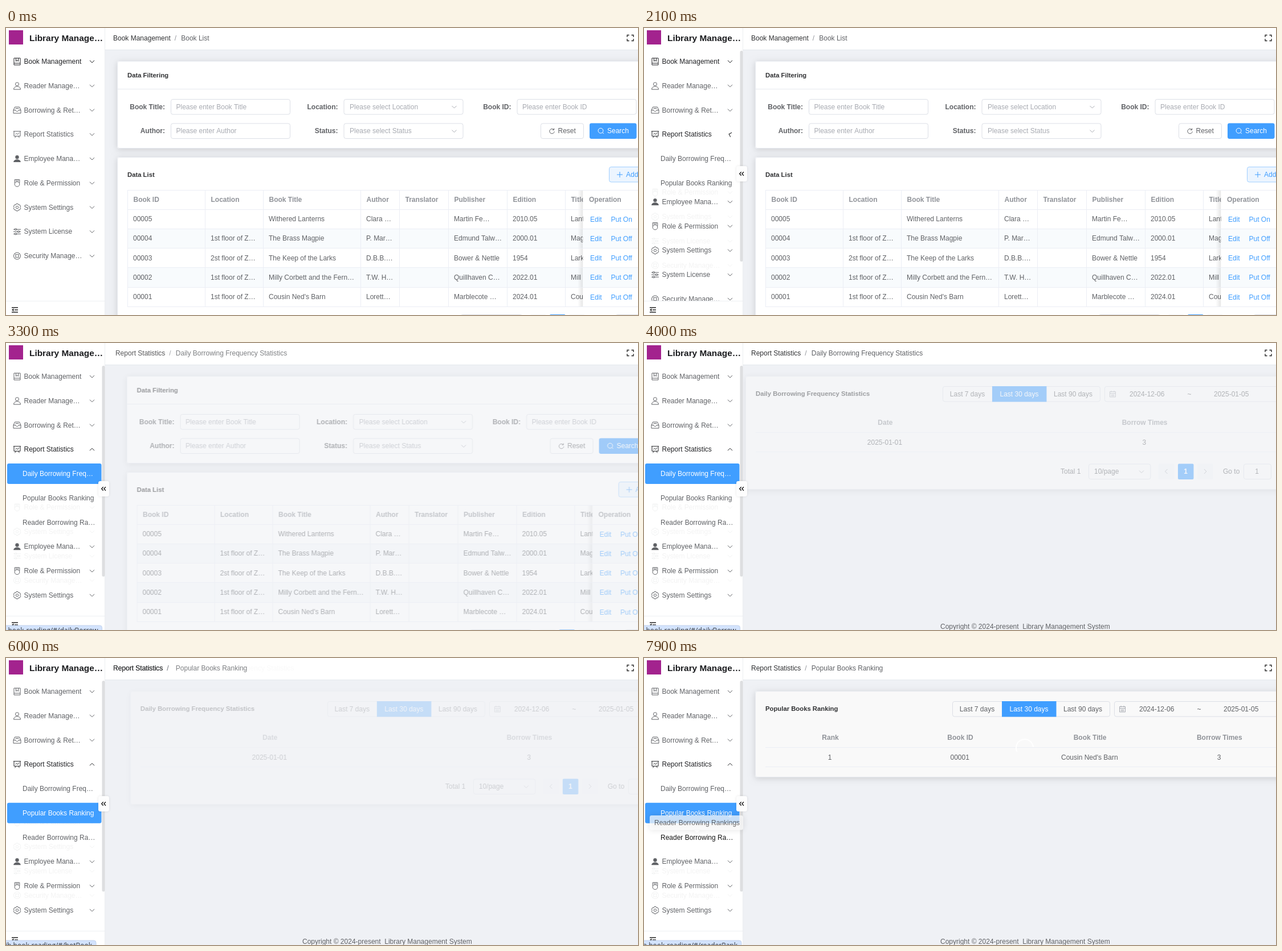
Recreate the animation shown at these times as an HTML page with a canvas. Size 1109 by 505 pixels, loop 8 s.

```html
<!DOCTYPE html>
<html lang="en">
<head>
<meta charset="utf-8">
<title>Library admin</title>
<style>
html, body { margin: 0; width: 100%; height: 100%; overflow: hidden; background: #fff; }
canvas { display: block; }
</style>
</head>
<body>
<canvas id="stage" width="1109" height="505"></canvas>
<script>
const LOOP = 8000, STEP = 100, ROW = 42.76;
const FAMILY = '"Liberation Sans", Arial, sans-serif';
const REG = '12px ' + FAMILY, BOLD = 'bold 12px ' + FAMILY, HEAD = 'bold 11.3px ' + FAMILY;
const INK = '#303133', TEXT = '#606266', MUTED = '#909399', HINT = '#a8abb2';
const BLUE = '#409eff', LINE = '#ebeef5', BORDER = '#dcdfe6', DARK = '#141414';

const stage = document.getElementById('stage').getContext('2d');
const layer = document.createElement('canvas');
layer.width = 1160;
layer.height = 505;
const page = layer.getContext('2d');
let c = stage;

// ---- easing ----
const clamp = v => Math.max(0, Math.min(1, v));
function bezier(x1, y1, x2, y2) {
  const at = (a, b, u) => 3 * a * u * (1 - u) ** 2 + 3 * b * u * u * (1 - u) + u ** 3;
  return x => {
    if (x <= 0 || x >= 1) return clamp(x);
    let lo = 0, hi = 1;
    for (let i = 0; i < 24; i++) {
      const mid = (lo + hi) / 2;
      if (at(x1, x2, mid) < x) lo = mid; else hi = mid;
    }
    return at(y1, y2, lo);
  };
}
const ease = bezier(.25, .1, .25, 1);
const easeInOut = bezier(.42, 0, .58, 1);

// ---- drawing helpers ----
function text(s, x, y, color = TEXT, font = REG, align = 'left') {
  c.font = font;
  c.fillStyle = color;
  c.textAlign = align;
  c.fillText(s, x, y);
}
function rect(x, y, w, h, color) {
  c.fillStyle = color;
  c.fillRect(x, y, w, h);
}
function box(x, y, w, h, fill, border, r = 3.4) {
  c.beginPath();
  c.roundRect(x, y, w, h, r);
  if (fill) { c.fillStyle = fill; c.fill(); }
  if (border) { c.strokeStyle = border; c.lineWidth = 1; c.stroke(); }
}
function path(d, x, y, color, width = 1, fill = false) {
  c.save();
  c.translate(x, y);
  const p = new Path2D(d);
  c.strokeStyle = c.fillStyle = color;
  c.lineWidth = width;
  if (fill) c.fill(p); else c.stroke(p);
  c.restore();
}
function chevron(x, y, color, turn = 0) {
  c.save();
  c.translate(x, y);
  c.rotate(turn);
  path('M-4-2L0 2L4-2', 0, 0, color);
  c.restore();
}
function shadowed(blur, color, dy, draw) {
  c.save();
  c.shadowBlur = blur;
  c.shadowColor = color;
  c.shadowOffsetY = dy;
  draw();
  c.restore();
}
function card(y, h, fill) {
  shadowed(12, 'rgba(0,0,0,.14)', 2, () => box(195, y, 990, h, fill, null));
  box(195.5, y + .5, 990, h - 1, null, '#e6e9ef');
}
const ring = r => `M${-r} 0a${r} ${r} 0 1 0 ${2 * r} 0a${r} ${r} 0 1 0 ${-2 * r} 0`;

// ---- sidebar ----
const ICONS = [
  'M-5.5-6H5.5V6H-5.5ZM-5.5 3H5.5M-2-6V-.5L0-2L2-.5V-6',
  'M-3-3a3 3 0 1 0 6 0a3 3 0 1 0-6 0M-6 6.3c0-7 12-7 12 0Z',
  'M-6.5 0L-4-5.5H4L6.5 0V5.5H-6.5ZM-6.5 0H-2.5C-2.5 3 2.5 3 2.5 0H6.5M-3-3H3',
  'M-6.5-5.5H6.5M-5.5-5.5V3H5.5V-5.5M-3 0L-1-2L1 0L3.5-3M-2 3L-4 6M2 3L4 6',
  'M-3.2-2.8a3.2 3.2 0 1 0 6.4 0a3.2 3.2 0 1 0-6.4 0M-6.3 6c0-6.5 12.6-6.5 12.6 0Z',
  'M-4.3 2a4.3 4.3 0 1 0 8.6 0a4.3 4.3 0 1 0-8.6 0M-4.3 0V-6H4.3V0M-1.5-6V-2M1.5-6V-2',
  ring(2.2) + 'M-1.5-6.3H1.5L2.3-4.5H4.6L6.2-1.7L5 0L6.2 1.7L4.6 4.5H2.3L1.5 6.3H-1.5L-2.3 4.5H-4.6L-6.2 1.7L-5 0L-6.2-1.7L-4.6-4.5H-2.3Z',
  'M-6.5-4H-4M-1-4H6.5M-6.5 0H1M4 0H6.5M-6.5 4H-4M-1 4H6.5M-4-5.2H-1V-2.8H-4ZM1-1.2H4V1.2H1ZM-4 2.8H-1V5.2H-4Z',
  ring(6) + ring(2.8) + 'M-4.2-4.2L-2-2M4.2-4.2L2-2M-4.2 4.2L-2 2M4.2 4.2L2 2'
];
const MENU = ['Book Management', 'Reader Manage…', 'Borrowing & Ret…', 'Report Statistics',
  'Employee Mana…', 'Role & Permission', 'System Settings', 'System License', 'Security Manage…'];
const SUBMENU = ['Daily Borrowing Freq…', 'Popular Books Ranking', 'Reader Borrowing Ra…'];
const REPORT = 3;

function menuItem(i, y, color, turn) {
  path(ICONS[i], 19.5, y, color, 1, i === 4);
  text(MENU[i], 31.5, y + 4, color);
  chevron(151, y, color, turn);
}

function menuColor(i, t) {
  const dark = i === 0 ? t < 2900
    : i === REPORT ? (t >= 1700 && t < 2400) || t >= 2900
    : i === 4 ? t >= 1200 && t < 1500
    : i === 5 && t >= 1200 && t < 1700;
  return dark ? '#222326' : TEXT;
}

function subColor(i, t, active) {
  if (i === active) return '#fff';
  const hover = [t >= 2400 && t < 2800, t >= 5000 && t < 5700, t >= 7700][i];
  return hover ? DARK : TEXT;
}

function sidebar(t) {
  rect(0, 0, 174, 505, '#fff');
  rect(173, 0, 1, 505, '#eceef1');
  box(5, 4, 25, 25, '#a3238e', null, 0);
  text('Library Manage…', 41, 23, '#1b1c1f', 'bold 15.4px ' + FAMILY);

  const open = easeInOut((t - 1934) / 300);
  const shift = open * 3 * ROW;
  const active = t >= 5700 ? 1 : t >= 2800 ? 0 : -1;

  c.save();
  c.beginPath();
  c.rect(0, 38, 174, 442);
  c.clip();

  // faint trail left by the unfolding rows
  if (t >= 2100) {
    c.globalAlpha = .08;
    for (let i = 5; i < 9; i++) {
      if (i === 6 && t >= 7700) continue;
      menuItem(i, 59 + i * ROW + 16.5, TEXT, 0);
    }
    c.globalAlpha = 1;
  }
  MENU.forEach((_, i) => {
    menuItem(i, 59 + i * ROW + (i > REPORT ? shift : 0), menuColor(i, t), i === REPORT ? open * Math.PI : 0);
  });
  c.beginPath();
  c.rect(0, 209, 174, shift);
  c.clip();
  SUBMENU.forEach((label, i) => {
    const y = 230 + i * ROW;
    if (i === active) box(2, y - 18, 165.5, 36, BLUE, null, 3);
    text(label, 29, y + 4, subColor(i, t, active));
  });
  c.restore();

  if (t >= 2100) box(168.5, 40, 5, 371, '#dddee0', null, 2.5);
  rect(0, 480, 173, 1, '#eef0f3');
  path('M10-4H21M15 0H21M10 4H21', 0, 496, '#222', 1.3);
  path('M10 0L13.5-2.6V2.6Z', 0, 496, '#222', 1, true);
}

function foldButton(t) {
  if (t >= 1500) shadowed(4, 'rgba(0,0,0,.1)', 0, () => box(162, 243, 19, 27, '#fdfdfd', null));
  if (t >= 900) path('M-.6-3.3L-3.6 0L-.6 3.3M3.6-3.3L.6 0L3.6 3.3', 171.3, 256.5, '#111', 1.3);
}

function statusBar(t) {
  if (t < 2400) return;
  const [w, url] = t >= 7700 ? [171, 'lib.book-reading/#/readerRank']
    : t >= 5000 ? [158, 'lib.book-reading/#/hotBook']
    : [168.5, 'lib.book-reading/#/dailyBorrow'];
  box(-1, 497, w + 1, 12, '#d3e3fd', '#c3d3ec', [0, 4, 0, 0]);
  text(url, w - 7, 509.5, '#33383f', '12px "Open Sans", sans-serif', 'right');
}

function tooltip(label, x, y, w, textX, arrowX, alpha) {
  if (alpha <= 0) return;
  c.save();
  c.globalAlpha = alpha;
  const shape = new Path2D();
  shape.roundRect(x, y, w, 25.5, 3.4);
  shape.moveTo(arrowX - 6, y + 25);
  shape.lineTo(arrowX, y + 30.5);
  shape.lineTo(arrowX + 6, y + 25);
  shadowed(11, 'rgba(0,0,0,.16)', 0, () => { c.fillStyle = '#fff'; c.fill(shape); });
  text(label, textX, y + 16.7, INK);
  c.restore();
}

function tooltips(t) {
  const fade = t < 1200 ? 0 : t < 1300 ? .5 : t < 1600 ? 1 : (1800 - t) / 300;
  tooltip('Employee Management', 12, 191, 143, 20.5, 83, fade);
  tooltip('Daily Borrowing Frequency Statistics', -1, 191, 210, 7, 93,
    t < 2500 || t >= 2800 ? 0 : t < 2600 ? .5 : 1);
  tooltip('Reader Borrowing Rankings', 10, 277, 164, 18, 93, t < 7800 ? 0 : t < 7900 ? .35 : .72);
}

// ---- header ----
function crumb(first, last, move, alpha, keepFirst) {
  c.save();
  c.font = REG;
  const end = 188 + c.measureText(first).width;
  c.globalAlpha = keepFirst ? 1 : alpha;
  text(first, 188 + (keepFirst ? 0 : move), 22, INK);
  text('/', end + 7 + (keepFirst ? 0 : move), 22, MUTED);
  c.globalAlpha = alpha;
  text(last, end + 18.5 + move, 22, TEXT);
  c.restore();
}

const CRUMBS = [['Book Management', 'Book List'],
  ['Report Statistics', 'Daily Borrowing Frequency Statistics'],
  ['Report Statistics', 'Popular Books Ranking']];

function header(t) {
  rect(174, 0, 935, 38, '#fff');
  rect(174, 38, 935, 1, '#e5e8ed');
  path('M-5.5-1.5V-5H-2M2-5H5.5V-1.5M5.5 1.5V5H2M-2 5H-5.5V1.5', 1095.5, 17.5, '#222', 1.3);
  const next = t >= 4500 ? 2 : 1;
  const e = ease((t - (next === 2 ? 5750 : 3050)) / 500);
  const keep = next === 2;
  if (e < 1) crumb(...CRUMBS[next - 1], 20 * e, (1 - e) ** 2, keep);
  if (e > 0) crumb(...CRUMBS[next], 20 * (1 - e), e, keep);
}

// ---- pages ----
function field(label, right, y, hint, select) {
  text(label, right, y + 17.5, TEXT, BOLD, 'right');
  const x = right + 10.5;
  box(x, y + .5, 209, 26.5, '#fff', BORDER);
  text(hint, x + (select ? 10 : 9), y + 17.5, HINT);
  if (select) chevron(x + 193.5, y + 14, HINT);
}

function pager(y) {
  text('Total 1', 748, y + 17.7);
  box(797.5, y + .5, 108.5, 26.5, null, BORDER);
  text('10/page', 807, y + 17.7);
  chevron(890, y + 14, HINT);
  box(920, y, 27.5, 27.5, '#f4f6f9', null, 2);
  box(954, y, 27.5, 27.5, BLUE, null, 2);
  box(988, y, 27.5, 27.5, '#f4f6f9', null, 2);
  path('M2-4L-2 0L2 4', 933.5, y + 13.5, HINT);
  path('M-2-4L2 0L-2 4', 1002, y + 13.5, HINT);
  text('1', 967.7, y + 17.7, '#fff', BOLD, 'center');
  text('Go to', 1033, y + 17.7);
  box(1069.5, y + .5, 48, 26.5, null, BORDER);
  text('1', 1092.7, y + 17.7, TEXT, REG, 'center');
}

const COLS = [213, 349, 451, 622, 690, 776, 879, 981];
const HEADS = ['Book ID', 'Location', 'Book Title', 'Author', 'Translator', 'Publisher', 'Edition', 'Title'];
const BOOKS = [
  ['00005', '', 'Withered Lanterns', 'Clara …', '', 'Martin Fe…', '2010.05', 'Lant'],
  ['00004', '1st floor of Z…', 'The Brass Magpie', 'P. Mar…', '', 'Edmund Talw…', '2000.01', 'Mag'],
  ['00003', '2st floor of Z…', 'The Keep of the Larks', 'D.B.B.…', '', 'Bower & Nettle', '1954', 'Lark'],
  ['00002', '1st floor of Z…', 'Milly Corbett and the Fern…', 'T.W. H…', '', 'Quillhaven C…', '2022.01', 'Mill'],
  ['00001', '1st floor of Z…', "Cousin Ned's Barn", 'Lorett…', '', 'Marblecote …', '2024.01', 'Cou']
];

function bookTable() {
  const rowY = i => 319.5 + i * 34.15;
  BOOKS.forEach((book, i) => {
    if (i % 2) rect(213, rowY(i), 960, 34, '#f8fbfd');
    book.forEach((s, k) => text(s, COLS[k] + 10, rowY(i) + 20.7));
  });
  HEADS.forEach((s, k) => text(s, COLS[k] + 10.5, 306, MUTED, BOLD));
  COLS.forEach(x => rect(x, 286, 1, 204, LINE));

  const shade = c.createLinearGradient(1003, 0, 1013, 0);
  shade.addColorStop(0, 'rgba(0,0,0,0)');
  shade.addColorStop(1, 'rgba(0,0,0,.1)');
  rect(1003, 286, 9.5, 204, shade);
  rect(1012.5, 286, 160, 204, '#fff');
  text('Operation', 1023, 306, MUTED, BOLD);
  BOOKS.forEach((_, i) => {
    if (i % 2) rect(1012.5, rowY(i), 160, 34, '#f8fbfd');
    text('Edit', 1025, rowY(i) + 21.5, BLUE);
    text(i ? 'Put Off' : 'Put On', 1061.5, rowY(i) + 21.5, BLUE);
  });
  rect(213, 285, 960, 1, LINE);
  for (let i = 0; i < 6; i++) rect(213, Math.floor(rowY(i)), 960, 1, LINE);
}

function listPage() {
  card(58, 154, '#fff');
  text('Data Filtering', 213, 86.5, INK, HEAD);
  rect(195, 107, 990, 1, '#e6e9ef');
  field('Book Title:', 279, 125, 'Please enter Book Title');
  field('Location:', 582.5, 125, 'Please select Location', true);
  field('Book ID:', 886.5, 125, 'Please enter Book ID');
  field('Author:', 279, 167.5, 'Please enter Author');
  field('Status:', 582.5, 167.5, 'Please select Status', true);
  box(938.5, 168, 75, 26.5, '#fff', BORDER);
  path('M3.2-2.6A4.2 4.2 0 1 0 4.2.6M3.6-5V-2.2H.8', 958, 181.5, TEXT);
  text('Reset', 968.5, 185.3);
  box(1024, 167.5, 82.5, 27.5, BLUE, null);
  path(ring(4.4) + 'M3.2 3.2L5.4 5.4', 1043.5, 180.7, '#fff');
  text('Search', 1055, 185.3, '#fff');

  card(227, 330, '#fff');
  text('Data List', 213, 261.5, INK, HEAD);
  box(1058.5, 244.5, 82, 26.5, '#ecf5ff', '#a0cfff');
  path('M-5 0H5M0-5V5', 1077, 258, BLUE);
  text('Add', 1088, 262.3, BLUE);
  bookTable();
  pager(504);
}

function reportPage(title, height, fill, cols) {
  card(58, height, fill);
  text(title, 213, 93.3, INK, HEAD);
  box(541.5, 76.5, 276, 26.5, null, BORDER);
  rect(628, 76, 95.5, 27.5, BLUE);
  text('Last 7 days', 584.5, 94, TEXT, REG, 'center');
  text('Last 30 days', 675.5, 94, '#fff', REG, 'center');
  text('Last 90 days', 770, 94, TEXT, REG, 'center');
  box(825.5, 76.5, 330, 26.5, null, BORDER);
  path('M-5-4.5H5V5H-5ZM-5-1.5H5M-2.5-6V-3.5M2.5-6V-3.5M-3 1H3M-3 3H3', 839.5, 90, HINT);
  text('2024-12-06', 869, 94);
  text('~', 974, 94, TEXT, REG, 'center');
  text('2025-01-05', 1017, 94);
  cols.forEach(([x, head, value]) => {
    text(head, x, 144.3, MUTED, BOLD, 'center');
    text(value, x - .8, 178.5, TEXT, REG, 'center');
  });
  rect(213, 157, 960, 1, LINE);
  rect(213, 191, 960, 1, LINE);
}

function dailyPage() {
  reportPage('Daily Borrowing Frequency Statistics', 200, '#fafbfb',
    [[440.3, 'Date', '2025-01-01'], [895.6, 'Borrow Times', '3']]);
  pager(212.5);
}

function popularPage() {
  reportPage('Popular Books Ranking', 152, '#f9f9f9', [
    [327, 'Rank', '1'], [555, 'Book ID', '00001'],
    [782.6, 'Book Title', "Cousin Ned's Barn"], [1009.8, 'Borrow Times', '3']]);
  c.beginPath();
  c.arc(668, 158, 15, Math.PI * .85, Math.PI * 1.97);
  c.strokeStyle = '#fff';
  c.lineWidth = 2;
  c.stroke();
}

function showPage(draw, dx, alpha) {
  if (alpha <= 0) return;
  page.clearRect(0, 0, layer.width, layer.height);
  c = page;
  draw();
  c = stage;
  c.save();
  c.beginPath();
  c.rect(174, 39, 935, 466);
  c.clip();
  c.globalAlpha = alpha;
  c.drawImage(layer, dx, 0);
  c.restore();
}
function leave(draw, t, start) {
  const e = ease((t - start) / 500);
  showPage(draw, 30 * e, 1 - e);
}
function enter(draw, t, start) {
  const e = ease((t - start) / 500);
  showPage(draw, -30 * (1 - e), e);
}

function content(t) {
  rect(174, 39, 935, 466, '#eff1f5');
  if (t >= 3900) text('Copyright © 2024-present  Library Management System', 520, 503.3);
  if (t < 3500) leave(listPage, t, 3140);
  else if (t < 5000) enter(dailyPage, t, 3870);
  else if (t < 6270) leave(dailyPage, t, 5770);
  else enter(popularPage, t, 6270);
}

function draw(t) {
  content(t);
  header(t);
  sidebar(t);
  foldButton(t);
  statusBar(t);
  tooltips(t);
}

const start = performance.now();
function tick() {
  const t = (performance.now() - start) % LOOP;
  draw(Math.floor(t / STEP) * STEP);
  requestAnimationFrame(tick);
}
tick();
</script>
</body>
</html>
```
